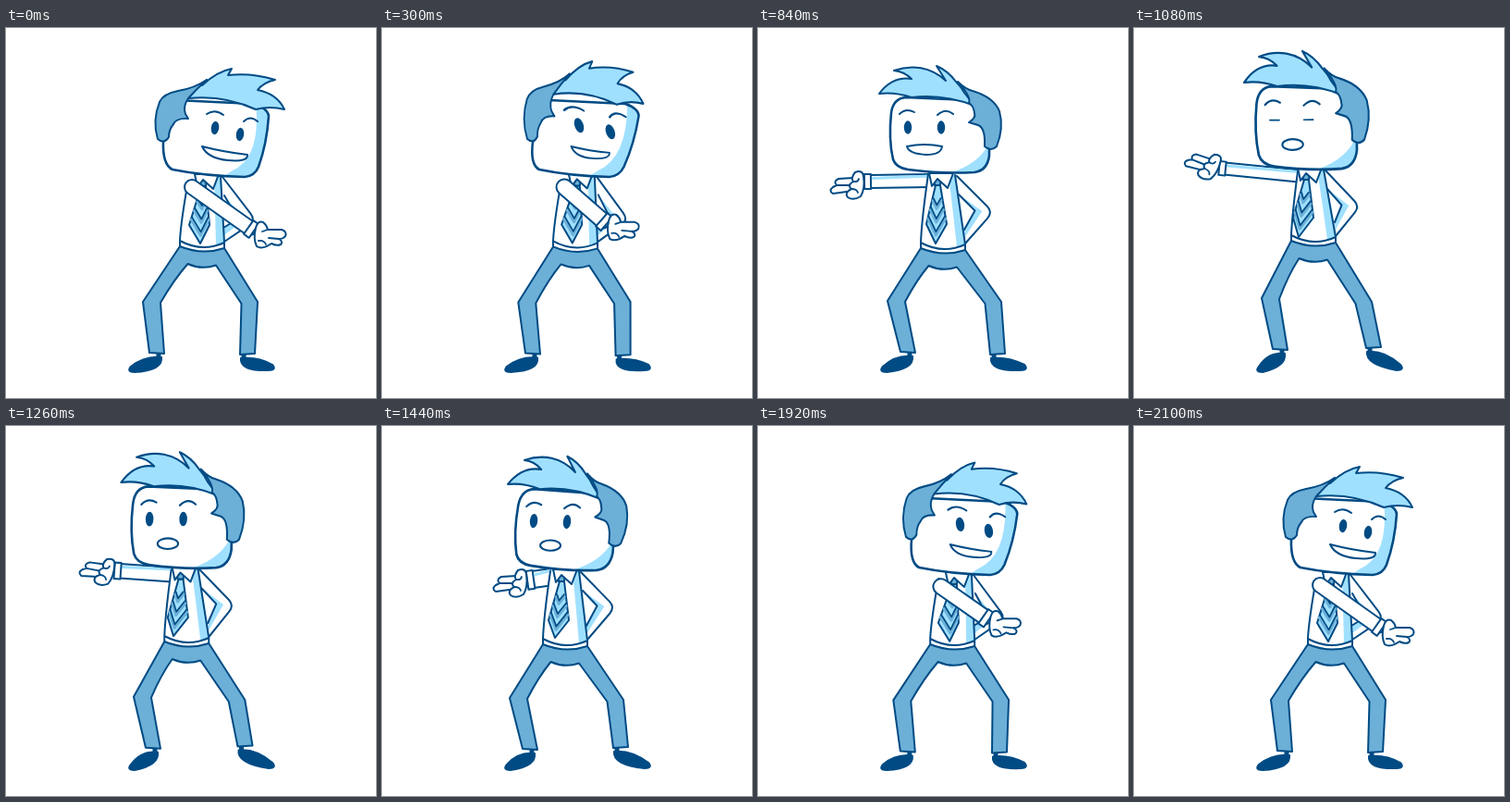
These frames come from a looping animation (400x400 px, 2160 ms). An HTML page with a canvas:

```html
<!DOCTYPE html>
<html lang="en">
<head>
<meta charset="utf-8">
<title>Dancing office worker</title>
<style>
html, body { margin: 0; width: 100%; height: 100%; overflow: hidden; background: #fff; }
canvas { display: block; width: 400px; height: 400px; }
</style>
</head>
<body>
<canvas id="stage" width="400" height="400"></canvas>
<script>
const ctx = document.getElementById('stage').getContext('2d');
const INK = '#004b84', MID = '#6cb0d8', LIGHT = '#a0e0ff', WHITE = '#fff';
const LOOP = 2160, STEP = 60;

const add = (p, x, y) => [p[0] + x, p[1] + y];
const mix = (p, q, u) => [p[0] + (q[0] - p[0]) * u, p[1] + (q[1] - p[1]) * u];

// Smooth interpolation of timed poses without overshoot; returns points
function sample(keys, t) {
  const last = keys.length - 1;
  let i = 0;
  while (i < last && keys[i + 1][0] <= t) i++;
  const slope = (j, n) => j < 0 || j >= last ? 0 :
    (keys[j + 1][1][n] - keys[j][1][n]) / (keys[j + 1][0] - keys[j][0]);
  const tangent = (j, n) => {
    const a = slope(j - 1, n), b = slope(j, n);
    return a * b > 0 ? 2 * a * b / (a + b) : 0;
  };
  const value = (p, n) => {
    if (i === last || t <= keys[0][0]) return p;
    const span = keys[i + 1][0] - keys[i][0], u = (t - keys[i][0]) / span, v = 1 - u;
    return p * v * v * (1 + 2 * u) + keys[i + 1][1][n] * u * u * (3 - 2 * u)
      + span * u * v * (v * tangent(i, n) - u * tangent(i + 1, n));
  };
  const flat = keys[i][1].map(value), pts = [];
  for (let n = 0; n < flat.length; n += 2) pts.push([flat[n], flat[n + 1]]);
  return pts;
}

const bodyTimes = [0, 540, 840, 1080, 1440, 1680, 2100];
const bodyTrack = poses => bodyTimes.map((t, i) => [t, poses[i % poses.length]]);

function draw(d, fill, width = 2, color = INK) {
  const path = new Path2D(d);
  if (fill) { ctx.fillStyle = fill; ctx.fill(path); }
  if (width) { ctx.lineWidth = width; ctx.strokeStyle = color; ctx.stroke(path); }
}
const line = (p, q, width, color) => draw(`M${p}L${q}`, null, width, color);

function oval(x, y, rx, ry, fill, tilt = 0) {
  ctx.beginPath();
  ctx.ellipse(x, y, rx, ry, tilt, 0, 7);
  ctx.fillStyle = fill;
  ctx.fill();
  if (fill === WHITE) { ctx.lineWidth = 2; ctx.strokeStyle = INK; ctx.stroke(); }
}

// Draw with the plane moved so that one triple of points lands on another
function warp(from, to, paint) {
  const basis = ([a, b, c]) => new DOMMatrix([b[0] - a[0], b[1] - a[1], c[0] - a[0], c[1] - a[1], ...a]);
  ctx.save();
  ctx.setTransform(basis(to).multiply(basis(from).inverse()));
  paint();
  ctx.restore();
}

// Left waist, both outer knees (x only), left hem, right hem
const legTrack = bodyTrack([
  [188,236, 148,272, 155,351, 269,352],
  [181,237, 146,265, 155,352, 268,354],
  [176,238, 140,263, 154,350, 267,352],
  [170,230, 138,257, 150,347, 267,345],
  [174,236, 138,261, 152,349, 266,347],
  [181,236, 142,268, 152,352, 269,353]
]);
const rightWaist = w => add(w, 48, 2);

function shoe(heel, toe, dir) {
  line(add(heel, dir * 3, -4), add(heel, dir * 3, 1), 5);
  draw(`M${heel}Q${add(heel, dir * 18, -2)} ${add(toe, -dir * 3, -4)}Q${add(toe, dir * 2, 2)} ${add(toe, -dir * 7, 2)}
    Q${add(heel, -dir * 2, 14)} ${heel}Z`, INK);
}

function drawLegs([waist, [kneeL, kneeR], hemL, hemR]) {
  const end = rightWaist(waist), c1 = add(waist, 8.5, 19), c2 = add(waist, 39, 20.5);
  const outL = [kneeL, hemL[1] - 55], outR = [kneeR, 296];
  const inL = add(outL, 19, 1), inR = add(outR, -17.5, 2);
  shoe(add(hemL, 13, 5), [132, 370], -1);
  shoe(add(hemR, -15, 5), [291, 368], 1);
  draw(`M${waist}Q${mix(waist, outL, .45)} ${outL}L${hemL}L${add(hemL, 16, 1)}L${inL}
    Q${add(mix(inL, c1, .6), -3, 0)} ${c1}Q${add(mix(c1, c2, .5), 0, 6)} ${c2}Q${mix(c2, inR, .4)} ${inR}
    L${add(hemR, -16, 1)}L${hemR}L${outR}L${end}Q${add(mix(waist, end, .5), 0, 9)} ${waist}Z`, MID);
}

// Left shoulder, tie knot, tie corner, tie tip, bent elbow
const torsoTrack = bodyTrack([
  [197,165, 213,166, 198,213, 210,233, 270,208],
  [190,164, 207,165, 189,212, 200,232, 261,206],
  [184,158, 194,165, 182,212, 192,233, 254,199],
  [177,155, 186,159, 172,205, 178,226, 244,193],
  [182,157, 194,163, 180,210, 187,229, 252,196],
  [190,165, 208,166, 187,212, 199,232, 261,207]
]);

function drawBentArm(shoulder, e, waist) {
  const o = add(shoulder, 2, 1), h = add(waist, 0, -7);
  const it = add(shoulder, 4, 21), ie = add(e, -19.5, -1.5), ih = add(h, -1, -15);
  const outer = `M${o}L${mix(o, e, .84)}Q${e} ${mix(e, h, .2)}L${h}`;
  draw(`${outer}L${ih}L${ie}L${it}Z`, WHITE, 0);
  draw(`M${it}L${ie}L${ih}L${mix(ih, h, .55)}L${mix(ie, e, .4)}Z`, LIGHT, 0);
  draw(`${outer}M${ih}L${ie}L${it}`);
}

function drawShirt(tl, tr, wl, wr) {
  const bl = add(wl, 0, -6), br = add(wr, 0, -6), low = add(mix(bl, br, .5), 0, 12);
  const outline = `M${tl}Q${bl[0] + 1},${(tl[1] + bl[1]) / 2 + 12} ${bl}Q${low} ${br}L${tr}`;
  draw(outline, WHITE, 0);
  draw(`M${tr}L${br}L${add(br, -9, 3)}L${add(mix(tr, br, .5), -8, 0)}L${add(tr, -7, 0)}Z`, LIGHT, 0);
  draw(`${outline}M${bl}L${wl}M${br}L${wr}`);
}

function drawTie(k, left, tip) {
  const top = add(k, 0, 4), right = add(left, 22, 0);
  draw(`M${add(k, -2, 5)}L${left}L${tip}L${right}L${add(k, 3, 5)}Z`, LIGHT);
  for (const u of [.35, .58, .8]) {
    const chevron = v => `M${mix(top, left, v)}L${mix(top, tip, v)}L${mix(top, right, v)}`;
    draw(chevron(u + .06), null, 3, MID);
    draw(chevron(u), null, 1.7);
  }
  draw(`M${add(k, -4, -2)}L${add(k, 4, -2)}L${add(k, 3, 5)}L${add(k, -3, 5)}Z`, MID);
  draw(`M${add(k, -9, -8)}L${add(k, -6, 6)}L${add(k, 0, -2)}L${add(k, 11, 8)}L${add(k, 17, -8)}Z`, WHITE);
}

// Shoulder, wrist, then hand tilt and sleeve radius
const armTrack = bodyTrack([
  [201,172, 263,216, 0,8],
  [192,172, 200,195, 0,9],
  [186,165, 121,166, 0,7],
  [178,160, 98,152, .38,6.5],
  [184,163, 163,166, 0,9],
  [190,176, 199,183, 0,9]
]);

// Hands are drawn around the wrist
const hands = {
  right() {
    draw('M7,0Q9,-8 15,-6Q19,-3 20,2L35,2Q41,4 39,9Q37,12 32,12Q37,15 34,18Q30,20 24,17Q14,24 8,20Q4,12 7,0Z', WHITE);
    draw('M32,12L21,11M20,2L14,4M10,14Q16,13 18,18', null, 1.8);
  },
  fist() {
    draw('M2,-12Q12,-16 20,-12Q23,-8 20,-5Q30,-6 28,2Q30,9 22,12Q10,17 4,11Z', WHITE);
    draw('M20,-5Q12,-6 9,-2M27,3Q18,6 12,3M7,-12L8,10M22,11Q15,11 12,8', null, 1.8);
  },
  left() {
    draw('M-18,-4L-34,-3Q-40,0 -36,4L-40,6Q-45,10 -40,13L-18,10ZM-36,4L-20,4', WHITE);
    draw('M-7,-6Q-8,-13 -16,-10Q-21,-4 -18,0Q-25,4 -20,8Q-28,12 -24,17Q-18,21 -10,16Q-5,8 -7,-6Z', WHITE);
    draw('M-18,0Q-13,1 -12,-3M-20,8Q-14,8 -13,12', null, 1.8);
  }
};

function drawArm([s, w, [tilt, r]], kind) {
  line(s, w, 2 * r + 2, INK);
  line(s, w, 2 * r - 2, WHITE);
  if (kind === 'left') line(add(s, 0, 2 - r), add(w, 3, 3.5 - r), 3, LIGHT);
  ctx.save();
  ctx.translate(...w);
  if (kind !== 'fist') {
    const angle = Math.atan2(w[1] - s[1], w[0] - s[0]);
    ctx.rotate(angle);
    draw(`M-1,${-r - 1}h7v${2 * r + 2}h-7Z`, WHITE);
    ctx.rotate(-angle);
  }
  ctx.rotate(tilt);
  hands[kind]();
  ctx.restore();
}

function drawFace(outline, shade) {
  draw(outline, WHITE, 0);
  ctx.save();
  ctx.clip(new Path2D(outline));
  draw(shade, LIGHT, 0);
  ctx.restore();
  draw(outline, null, 2.6);
}

// Anchors: fringe tip, nape, chin corner
const leftAnchors = [
  [164,58, 270,139, 162,143],
  [131,71, 255,131, 146,146],
  [119,59, 246,124, 135,142],
  [136,63, 255,130, 145,143]
];
const leftTrack = bodyTimes.slice(1, 6).map((t, i) => [t, leftAnchors[i % 4]]);
const leftBase = sample([leftTrack[1]], 0);

function drawLeftHead(t) {
  const gasp = t >= 960 && t < 1560, blink = t >= 1020 && t < 1200;
  warp(leftBase, sample(leftTrack, t), () => {
    drawFace('M160,75Q146,76 144,92Q141,120 146,142Q149,151 162,153Q200,158 234,156Q248,154 250,138L250,100L228,78Z',
      'M252,116Q246,146 203,158L252,160Z');
    draw('M131,71C140,59 152,53 166,55Q158,47 147,46C166,39 187,42 203,57L193,41Q205,46 214,58Q220,64 223,70L234,84Q200,71 166,75Q148,69 131,71Z', LIGHT);
    draw('M216,58Q224,66 232,68Q255,75 261,90Q266,108 258,128Q252,134 245,128Q246,108 238,105L228,102Q236,97 234,92Q233,84 228,81Q231,75 216,58Z', MID);
    draw('M153,93Q160,86 169,91M194,94Q203,86 211,93');
    if (blink) draw('M158,108h10M194,108h10', null, 1.5);
    else for (const x of [162, 198]) oval(x, 107.5, 4.2, 7.2, INK);
    if (gasp) oval(182, 132, 11, 5.3, WHITE);
    else draw('M161,128Q180,124 199,128Q198,137 182,137Q163,136 161,128Z', WHITE);
  });
}

// 0 is turned away, 1 is nearly facing the viewer
const turnTrack = [[0, [0]], [480, [1]], [1680, [1]], [2100, [0]]];

function drawRightHead(t) {
  const turn = sample(turnTrack, t)[0][0];
  const part = (from, shift, paint) =>
    warp(from, from.map((p, i) => add(p, shift[i][0] * turn, shift[i][1] * turn)), paint);
  part([[284, 92], [170, 122], [268, 160]], [[-9, 0], [-10, 0], [-18, 0]], () =>
    drawFace('M184,78Q172,95 170,122Q169,148 180,153Q215,160 258,161Q269,160 273,150Q282,125 284,95Q283,87 268,82Z',
      'M270,80Q276,140 245,154L233,162H286V80Z'));
  part([[301, 88], [163, 122], [268, 160]], [[-27, -9], [-10, 0], [-18, 0]], () => {
    draw('M197,76Q204,65 217,56L212,62Q228,47 244,44L240,51Q265,48 291,56Q278,59 272,67Q293,71 301,88Q285,84 270,88Q235,72 197,76Z', LIGHT);
    draw('M164,120Q158,100 166,80Q170,71 186,68Q204,65 217,56Q206,66 197,76Q191,85 194,93L197,98Q184,97 181,104Q176,110 176,118Q171,126 164,120Z', MID);
  });
  part([[226, 108], [253, 115], [212, 128]], [[-19, -4], [-9, -4], [-11, 0]], () => {
    oval(226, 108, 4.2, 7.2, INK, .15);
    oval(253, 115, 4.2, 7.2, INK, .15);
    draw('M217,93Q226,87 235,94M257,101Q264,94 272,101');
  });
  part([[212, 128], [261, 137], [240, 143]], [[-11, 0], [-22, -3], [-18, -3]], () =>
    draw('M212,128Q235,134 261,137Q262,145 240,143Q218,141 212,128Z', WHITE));
}

function render(t) {
  ctx.fillStyle = WHITE;
  ctx.fillRect(0, 0, 400, 400);
  ctx.lineJoin = ctx.lineCap = 'round';
  const leg = sample(legTrack, t), arm = sample(armTrack, t);
  const [shoulder, knot, corner, tip, elbow] = sample(torsoTrack, t);
  const right = add(knot, 19, -6), waist = rightWaist(leg[0]);
  const kind = t < 360 || t >= 1800 ? 'right' : t >= 660 && t < 1560 ? 'left' : 'fist';
  drawLegs(leg);
  drawBentArm(right, elbow, waist);
  if (kind === 'left') drawArm(arm, kind);
  drawShirt(shoulder, right, leg[0], waist);
  drawTie(knot, corner, tip);
  if (kind !== 'left') drawArm(arm, kind);
  if (t >= 420 && t < 1620) drawLeftHead(t);
  else drawRightHead(t);
}

const start = performance.now();
function tick() {
  const t = (performance.now() - start) % LOOP;
  render(Math.floor(t / STEP) * STEP);
  requestAnimationFrame(tick);
}
tick();
</script>
</body>
</html>
```
